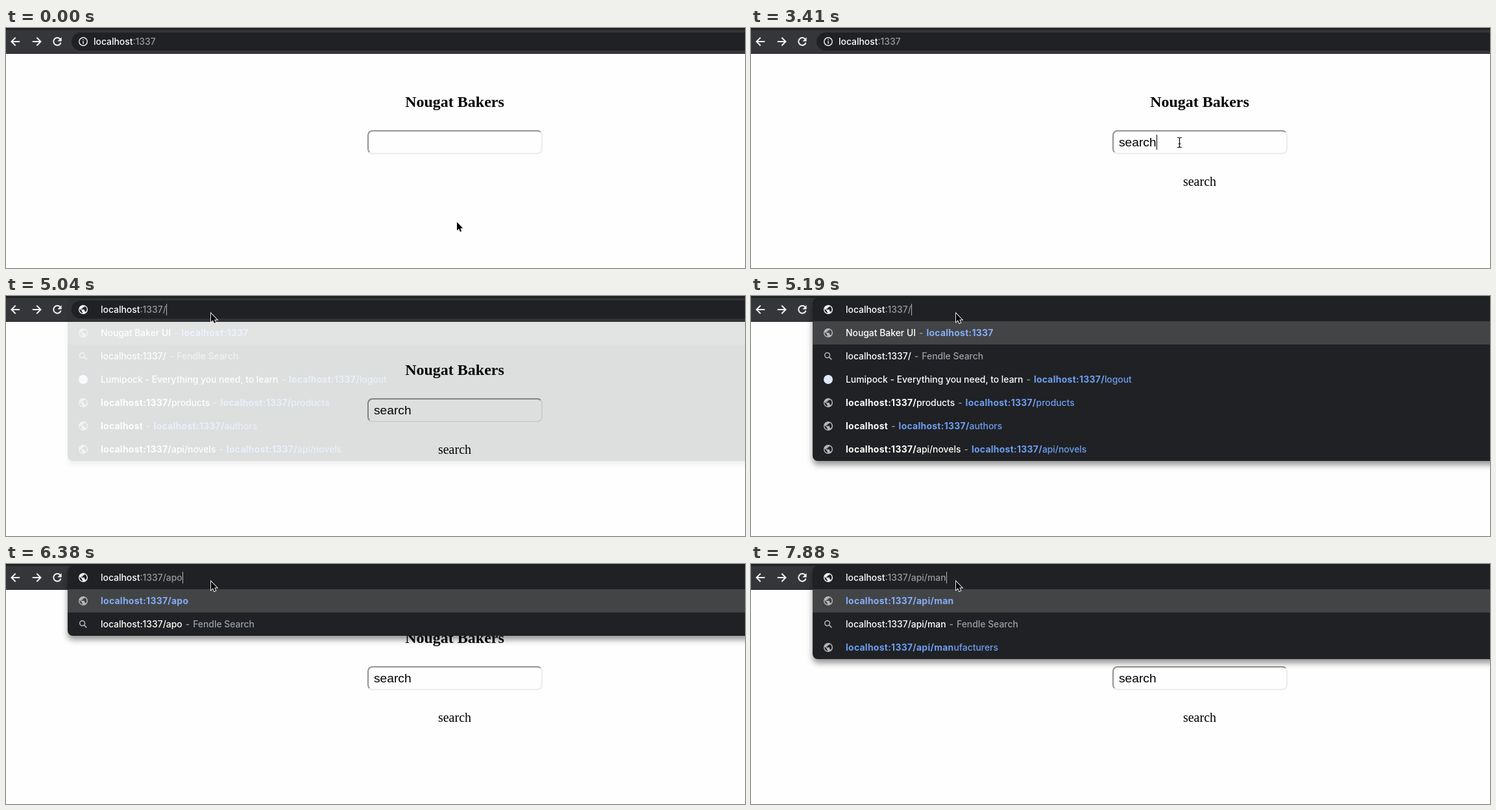
These frames come from a looping animation (1139 by 371 pixels, 8000 ms). An HTML page:

```html
<!DOCTYPE html>
<html lang="en">
<head>
<meta charset="utf-8">
<title>Nougat Bakers</title>
<style>
  html, body { margin: 0; width: 100%; height: 100%; overflow: hidden; background: #fefefe; }
  #stage { position: relative; width: 1139px; height: 371px; overflow: hidden; }
  #stage > * { position: absolute; }
  svg { display: block; overflow: visible; }

  h2, #result { left: 541.5px; width: 300px; margin: 0; text-align: center; font-family: "Liberation Serif", Times, serif; color: #000; }
  h2 { top: 101px; font-size: 24px; line-height: 27px; }
  #result { top: 226px; font-size: 20px; line-height: 22px; }
  #field {
    left: 557px; top: 158px; width: 270px; height: 37px; box-sizing: border-box; padding-left: 8px;
    border: 2px solid; border-color: #949494 #ebebeb #ebebeb #949494; border-radius: 8px;
    display: flex; align-items: center;
    font: 19.2px/22px "Liberation Sans", Arial, sans-serif; color: #000;
  }
  .caret { flex: none; width: 1px; height: 23px; margin-right: -1px; background: currentColor; }

  #bar { left: 0; top: 0; width: 1139px; height: 40px; background: #35363a; border-top: 3px solid #202124; border-bottom: 1px solid #2a2b2e; box-sizing: border-box; }
  #pill { left: 101px; top: 7px; width: 1060px; height: 28px; border-radius: 14px; background: #202124; }
  #pill.focus { box-shadow: 0 0 0 1px #8ab4f8, inset 0 0 0 1px #8ab4f8; }
  #nav { left: 0; top: 0; }

  #url, #popup { font: 500 13.9px/18px Inter, Roboto, sans-serif; white-space: pre; }
  #popup b { letter-spacing: .3px; }
  #url { left: 135px; top: 12px; height: 18px; display: flex; align-items: center; color: #fff; }
  #url.open { left: 146px; }
  #url .rest { color: #96999d; }
  #url .sel { background: #41638f; color: #dfe6ee; }
  #url .caret { height: 18px; background: #b4b6b9; }
  #badge { left: 111px; top: 13px; }

  #popup { left: 95px; top: 3px; width: 1070px; padding-top: 36px; border-radius: 8px; background: #202124; box-shadow: 0 6px 10px rgba(0, 0, 0, .42); overflow: hidden; }
  .row { position: relative; height: 36px; padding-left: 51px; display: flex; align-items: center; color: #fff; }
  .row:first-child { background: #434446; }
  .row svg { position: absolute; left: 16px; top: 10px; }
  .row .dim { color: #9aa0a6; }
  .row .dash { margin: 0 5px; }
  .row .link { color: #6c9ff2; }
  .row:first-child .link { color: #84aef8; }
  #mouse { left: 0; top: 0; }
</style>
</head>
<body>
<div id="stage">
  <h2>Nougat Bakers</h2>
  <div id="field"></div>
  <div id="result"></div>

  <div id="bar"></div>
  <div id="pill"></div>
  <svg id="nav" width="96" height="40" fill="none" stroke="#f1f3f4" stroke-width="2">
    <path id="back" d="M21.2 21H9.2M14.7 14.8L8.5 21L14.7 27.2"/>
    <use href="#back" transform="translate(62 0) scale(-1 1)"/>
    <path d="M83.6 17.2A5.8 5.8 0 1 0 84.6 22.6"/>
    <path d="M85.6 14.2V20.4H79.4Z" fill="#f1f3f4" stroke="none"/>
  </svg>

  <div id="popup"></div>
  <div id="badge"></div>
  <div id="url"></div>

  <svg id="mouse" width="1" height="1">
    <defs><path id="stem" d="M-3.5-7.5H-1.5Q0-7.5 0-6V6Q0 7.5-1.5 7.5H-3.5M3.5-7.5H1.5Q0-7.5 0-6M0 6Q0 7.5 1.5 7.5H3.5M-2 2H2"/></defs>
    <path id="arrow" transform="scale(.9)" d="M0 0V14.5L3.3 11.5L5.5 16.7L8 15.6L5.8 10.6H10.3Z" fill="#000" stroke="#fff" paint-order="stroke" stroke-width="2"/>
    <g id="beam" fill="none" transform="translate(.5 0)">
      <use href="#stem" stroke="#fff" stroke-width="2.6"/>
      <use href="#stem" stroke="#000" stroke-width="1.2"/>
    </g>
  </svg>
</div>

<script>
const LOOP = 8000;
const HOST = 'localhost', PORT = ':1337', ROOT = HOST + PORT + '/';
const $ = id => document.getElementById(id);

// Each track holds [start time, values...]; values stay until the next entry.
const mouse = [
  [0, 695, 300, 'arrow'], [300, 692, 282, 'arrow'], [450, 679, 228, 'arrow'], [600, 665, 186, 'beam'], [740, 662, 177, 'beam'],
  [3410, 660, 177, 'beam'], [3560, 648, 167, 'beam'], [3710, 596, 136, 'arrow'], [3850, 500, 94, 'arrow'], [4000, 396, 56, 'arrow'],
  [4150, 332, 33, 'beam'], [4300, 318, 28, 'beam'], [4450, 316, 27, 'beam'], [5040, 316, 27, 'arrow']
];
const typed = [[0, ''], [1480, 's'], [1630, 'se'], [1770, 'sea'], [2070, 'sear'], [2370, 'search']];
const fieldCaret = [[0, false], [740, true], [1190, false], [1480, true], [2970, false], [3410, true], [4300, false]];
const ring = [[0, false], [4300, true], [5040, false]];
const fade = [[0, 0], [5040, .14], [5190, 1]];
// path (null before typing), selected text, caret
const address = [
  [0, null, '', false], [4300, null, 'all', false], [4750, null, '', true],
  [5040, '', '', true], [5490, 'ap', 'i/novels', false],
  [5790, 'apo/', '', true], [6380, 'apo', '', true], [6530, 'ap', '', true], [6980, 'ap', '', false],
  [7130, 'api', '/novels', false], [7430, 'api/', 'novels', false],
  [7730, 'api/ma', '', true], [7880, 'api/man', '', true]
];

const at = (track, t) => track.reduce((last, entry) => entry[0] <= t ? entry : last).slice(1);

const svg = (body, color) => `<svg width="16" height="16" viewBox="0 0 16 16" fill="none" stroke="${color}" stroke-width="1.5">${body}</svg>`;
const globe = color => svg(`<path transform="translate(-.4 -.4) scale(.7)" fill="${color}" stroke="none" fill-rule="evenodd" d="M12 2a10 10 0 1 0 .01 0z
  M11 20a8 8 0 0 1-6.8-9.8L9 15v1a2 2 0 0 0 2 2z
  M17.9 17.4a2 2 0 0 0-1.9-1.4h-1v-3a1 1 0 0 0-1-1H8v-2h2a1 1 0 0 0 1-1V7h2a2 2 0 0 0 2-2v-.4a8 8 0 0 1 2.9 12.8z"/>`, color);
const info = svg('<circle cx="8" cy="8" r="6.2"/><path d="M8 7.2V11.4M8 4.5V6"/>', '#e8eaed');
const lens = svg('<circle cx="6.6" cy="6.6" r="3.9"/><path d="M9.5 9.5L13.4 13.4"/>', '#b4b7bb');
const dot = svg('<circle cx="8" cy="8" r="7" fill="#dfe8fb" stroke="none"/>', 'none');

const caret = on => on ? '<i class="caret"></i>' : '';
const dash = '<span class="dim dash">-</span>';

// Bold the part of the text that matches the query from its start.
function match(text, query) {
  let n = 0;
  while (n < text.length && text[n] === query[n]) n++;
  return `<b>${text.slice(0, n)}</b>${text.slice(n)}`;
}

function row(query, { title, link, icon = globe('#b4b7bb') }) {
  const head = title ? `<span>${match(title, query)}</span>${dash}` : '';
  return `<div class="row">${icon}${head}<span class="link">${match(link, query)}</span></div>`;
}

const searchRow = query => `<div class="row">${lens}<span>${query}</span>${dash}<span class="dim">Fendle Search</span></div>`;

const visited = [
  { title: 'Lumipock - Everything you need, to learn', link: ROOT + 'logout', icon: dot },
  { title: ROOT + 'products', link: ROOT + 'products' },
  { title: HOST, link: ROOT + 'authors' },
  { title: ROOT + 'api/novels', link: ROOT + 'api/novels' }
];
const routes = [visited[3], { link: ROOT + 'api/products' }, { link: ROOT + 'api/manufacturers' }];

function suggestions(path, completed) {
  const query = ROOT + path;
  let first = { link: query }, others = routes.filter(r => r.link.startsWith(query));
  if (!path) [first, others] = [{ title: 'Nougat Baker UI', link: HOST + PORT }, visited];
  else if (completed) [first, ...others] = others;
  return row(query, first) + searchRow(query) + others.map(r => row(query, r)).join('');
}

function addressText(path, selected, on) {
  if (selected === 'all') return `<span class="sel">${HOST + PORT}</span>`;
  const rest = PORT + (path === null ? '' : '/' + path);
  return `<span>${HOST}</span><span class="rest">${rest}</span><span class="sel">${selected}</span>${caret(on)}`;
}

const shown = {};
function fill(id, html) {
  if (shown[id] !== html) $(id).innerHTML = shown[id] = html;
}

function draw(t) {
  const [x, y, kind] = at(mouse, t);
  $('mouse').style.transform = `translate(${x}px, ${y}px)`;
  $('arrow').style.display = kind === 'arrow' ? '' : 'none';
  $('beam').style.display = kind === 'beam' ? '' : 'none';

  const [text] = at(typed, t);
  fill('field', `<span>${text}</span>${caret(at(fieldCaret, t)[0])}`);
  fill('result', text);

  const [path, selected, on] = at(address, t), open = path !== null;
  $('pill').classList.toggle('focus', at(ring, t)[0]);
  $('url').classList.toggle('open', open);
  fill('url', addressText(path, selected, on));
  fill('badge', open ? globe('#f1f3f4') : info);
  $('popup').style.opacity = at(fade, t)[0];
  fill('popup', open ? suggestions(path, selected) : '');
}

const start = performance.now();
function tick() {
  draw((performance.now() - start) % LOOP);
  requestAnimationFrame(tick);
}
tick();
</script>
</body>
</html>
```
